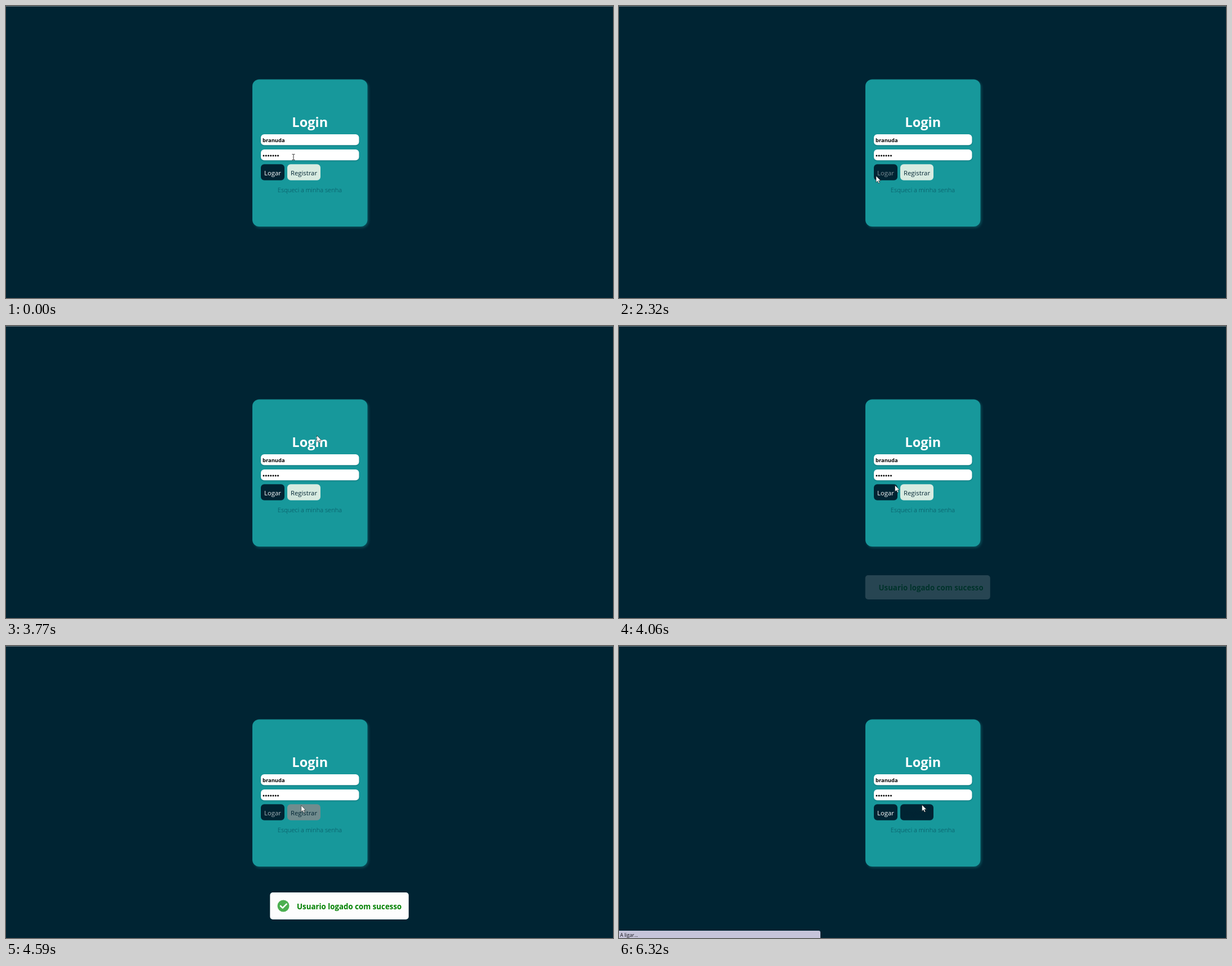
Recreate the animation shown at these times as an HTML page. Size 1079x519 px, loop 8000 ms.

```html
<!DOCTYPE html>
<html lang="pt">
<head>
<meta charset="utf-8">
<title>Login</title>
<style>
  html, body { margin: 0; width: 100%; height: 100%; overflow: hidden; background: #002433; }
  svg { display: block; width: 1079px; height: 519px; font-family: "Open Sans", "Noto Sans", sans-serif; }
  .card { fill: #17989b; filter: drop-shadow(2px 2px 2px #17989b60); }
  .field { fill: #fff; filter: drop-shadow(0 1px 1px #00243350); }
  .bold { font-weight: 700; }
  .middle { text-anchor: middle; }
  .line { fill: none; stroke-linecap: round; stroke-linejoin: round; }
</style>
</head>
<body>
<svg viewBox="0 0 1079 519">
  <rect width="1079" height="519" fill="#002433"/>
  <rect width="1079" height="1" fill="#6f8088"/>

  <rect class="card" x="438" y="130.5" width="204.5" height="261.5" rx="12"/>
  <text class="bold middle" x="540.3" y="215" font-size="23.6" fill="#fff">Login</text>
  <rect class="field" x="453" y="228" width="174.5" height="19.3" rx="6"/>
  <text class="bold" x="456" y="241.5" font-size="9.4">branuda</text>
  <rect class="field" x="453" y="255" width="174.5" height="19.3" rx="6"/>
  <path class="line" d="M458 266h26" stroke="#000" stroke-width="3" stroke-dasharray="0 4.25"/>

  <rect x="453" y="281.3" width="42" height="28.5" rx="6" fill="#002433"/>
  <text id="loginLabel" class="middle" x="474" y="300.5" font-size="11.3" font-weight="500">Logar</text>
  <rect id="registerBox" x="500" y="281.3" width="59" height="28.5" rx="6"/>
  <text class="middle" x="529.5" y="300.5" font-size="11.3" fill="#002433">Registrar</text>
  <text class="middle" x="540" y="331" font-size="11.1" font-weight="300" fill="#06505d">Esqueci a minha senha</text>

  <g id="toast">
    <rect id="toastBox" x=".3" rx="5" fill="#fdfdfd"/>
    <g id="toastIcon">
      <circle cx="24" cy="462" r="10.5" fill="#4caf50"/>
      <path class="line" d="M19 462l3.7 3.7 7-7" stroke="#fff" stroke-width="2.6"/>
    </g>
    <text id="toastText" class="bold" font-size="13.3" fill="#008000">Usuario logado com sucesso</text>
  </g>

  <g id="status">
    <path d="M0 506h355q3 0 3 3v10H0z" fill="#c6c4da"/>
    <text x="2" y="517" font-size="8.6" fill="#15141a">A ligar...</text>
  </g>

  <path id="arrow" d="M0 0v11.5l2.6-2.4 1.9 4 1.9-.9-1.9-3.8h3.7z" fill="#fff" stroke="#111" stroke-width=".6"/>
  <path id="beam" d="M-2.5-4.5h2l.5.5.5-.5h2M0-4v9M-2.5 5.5h2l.5-.5.5.5h2" fill="none" stroke="#333"/>
</svg>
<script>
const LOOP = 8000, HOVER_MS = 350, STEP = 10;
const TOAST_IN = 4010, ICON_IN = 4110, TOAST_OUT = 5910, STATUS_IN = 5980;
const NAVY = [0, 36, 51], WHITE = [255, 255, 255], MINT = [216, 235, 225];

const el = id => document.getElementById(id);
const clamp = v => Math.min(1, Math.max(0, v));
const smooth = v => v * v * (3 - 2 * v);
const lerp = (a, b, k) => a.map((v, i) => v + (b[i] - v) * k);
const mix = (a, b, k) => `rgb(${lerp(a, b, k).map(Math.round)})`;
const set = (id, attrs) => {
  for (const name in attrs) el(id).setAttribute(name, attrs[name]);
};
const show = (id, on) => set(id, { visibility: on ? "visible" : "hidden" });

const overField = ([x, y]) => x > 453 && x < 627 && y > 228 && y < 274 && (y < 247 || y > 255);
const overButton = ([x, y], left, right) => x >= left && x <= right && y >= 281 && y <= 310;

// The pointer eases from stop to stop, resting where two stops coincide.
const inLogin = [457, 302], loginEdge = [490.5, 283];
const stops = [
  { at: 0, pos: [511, 268] },
  { at: 650, pos: [463, 304] },
  { at: 1280, pos: [459, 305] },
  { at: 1460, pos: [471, 298] },
  { at: 1830, pos: [641, 417] },
  { at: 2210, pos: inLogin },
  { at: 2900, pos: inLogin },
  { at: 3140, pos: [620, 332] },
  { at: 3350, pos: [481, 288] },
  { at: 3700, pos: [560, 184] },
  { at: 4050, pos: loginEdge },
  { at: 4300, pos: loginEdge },
  { at: 4750, pos: [538.5, 283.5] },
  { at: 6320, pos: [538.5, 282.2] }
];

function pointerAt(t) {
  const i = stops.findIndex(s => s.at > t);
  if (i < 0) return stops.at(-1).pos;
  const from = stops[i - 1], to = stops[i];
  return lerp(from.pos, to.pos, smooth((t - from.at) / (to.at - from.at)));
}

// Each button's fade follows the pointer's history since the loop began.
function hoverLevel(t, left, right) {
  let level = 0;
  for (let s = 0; s < t; s += STEP) {
    const direction = overButton(pointerAt(s), left, right) ? 1 : -1;
    level = clamp(level + direction * STEP / HOVER_MS);
  }
  return smooth(level);
}

function drawToast(t) {
  const visible = t >= TOAST_IN && t < TOAST_OUT, hasIcon = t >= ICON_IN;
  const age = t - TOAST_IN;
  show("toast", visible);
  show("toastIcon", visible && hasIcon);
  set("toast", {
    transform: `translate(${469 - 33 * (1 - smooth(clamp(age / 400)))})`,
    opacity: clamp(age / 330)
  });
  // The box grows to make room for the icon.
  set("toastBox", hasIcon ? { y: 438, width: 246.5, height: 48 } : { y: 443, width: 222, height: 43 });
  set("toastText", hasIcon ? { x: 48, y: 468 } : { x: 24, y: 470 });
}

function draw(t) {
  const pointer = pointerAt(t);
  set("loginLabel", { fill: mix(WHITE, NAVY, hoverLevel(t, 453, 495)) });
  set("registerBox", { fill: mix(MINT, NAVY, hoverLevel(t, 500, 559)) });
  drawToast(t);
  show("status", t >= STATUS_IN);
  for (const id of ["arrow", "beam"]) {
    set(id, { transform: `translate(${pointer})` });
    show(id, (id === "beam") === overField(pointer));
  }
}

const start = performance.now();
function tick() {
  draw((performance.now() - start) % LOOP);
  requestAnimationFrame(tick);
}
tick();
</script>
</body>
</html>
```
